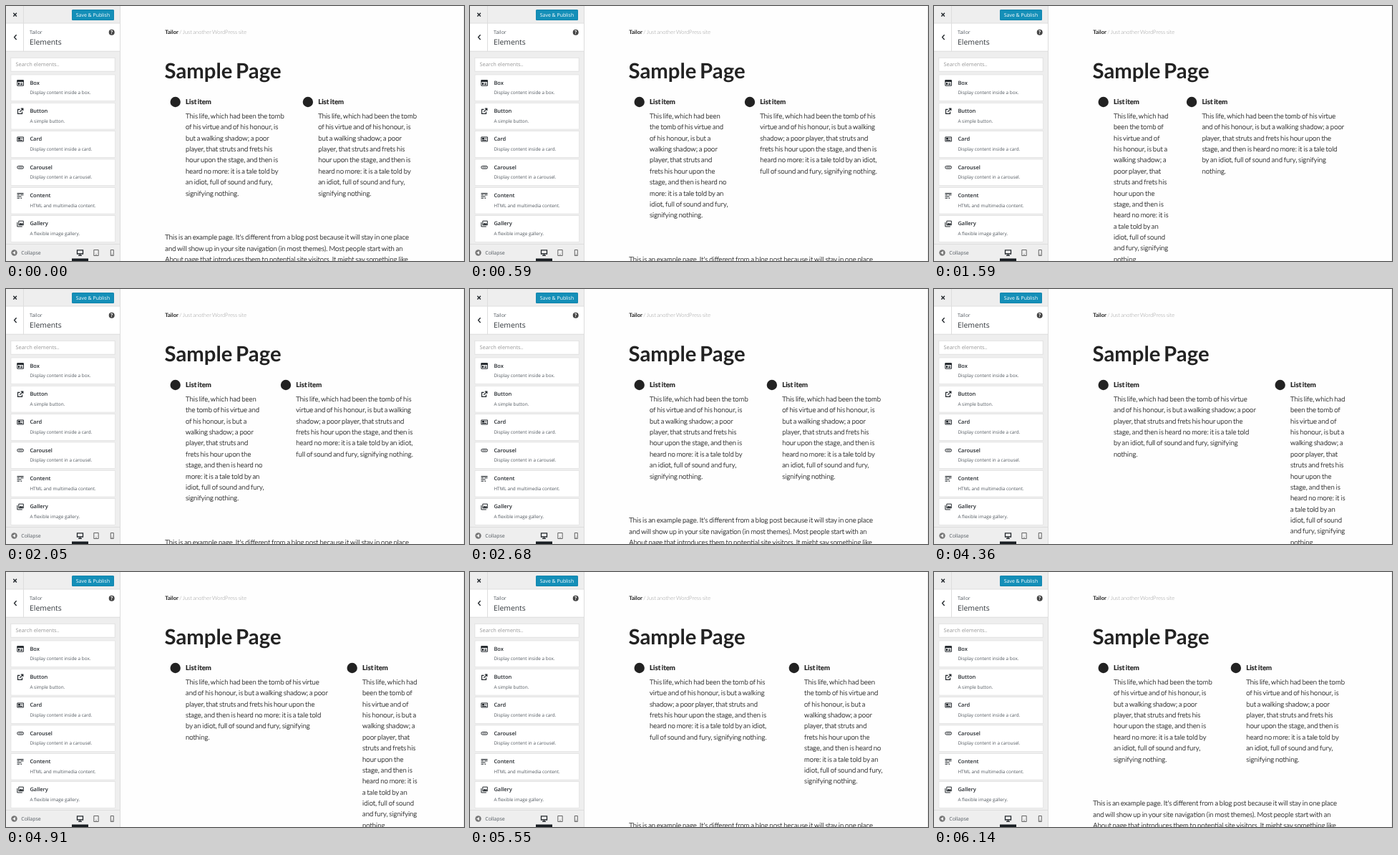
Write an HTML page that moves like this. It is 640x356 px and loops after 6630 ms.

```html
<!DOCTYPE html>
<html lang="en">
<head>
<meta charset="utf-8">
<title>Column resizing</title>
<style>
  html, body { margin: 0; width: 100%; height: 100%; overflow: hidden; background: #fefefe; }
  svg { display: block; width: 640px; height: 356px; }
  text { text-rendering: geometricPrecision; white-space: pre; }
  .page { font: 300 9.6px Lato, sans-serif; fill: #222; word-spacing: -.08em; }
  .page .bold { font-weight: 700; }
  #columns text { stroke: #222; stroke-width: .2px; }
  .panel { font: 6.93px "Open Sans", sans-serif; fill: #50575e; }
  .panel .name { font-size: 7.47px; font-weight: 600; fill: #23282d; }
  .panel .note { font-size: 6.4px; }
  .icon { fill: none; stroke: #23282d; stroke-width: 1; }
  .icon .solid { fill: #23282d; stroke: none; }
</style>
</head>
<body>
<svg viewBox="0 0 640 356">
  <g class="page">
    <text x="222.3" y="39" style="font-size:7.6px; word-spacing:-.08em"><tspan class="bold">Tailor</tspan><tspan fill="#999"> / Just another WordPress site</tspan></text>
    <text class="bold" x="221.5" y="101.2" style="font-size:29.3px; word-spacing:-.08em">Sample Page</text>
    <g id="columns"></g>
  </g>
  <path d="M639.5 0V356" stroke="#eee"/>
  <g class="panel">
    <path d="M0 0H159V356H0z" fill="#eee"/>
    <path d="M0 24H159V63H0z" fill="#fff"/>
    <path d="M159.5 0V356M0 24H159M0 63.2H159M24.5 0V63" stroke="#ddd" fill="none"/>
    <path d="M10.3 9.8l4.6 4.6m0-4.6l-4.6 4.6" stroke="#23282d" stroke-width="1.4"/>
    <path d="M14.6 40.2l-3 3.4 3 3.4" stroke="#23282d" stroke-width="1.4" fill="none"/>
    <rect x="92" y="5" width="59" height="15" rx="1.5" fill="#0f7ba3"/>
    <rect x="92.4" y="5.4" width="58.2" height="14" rx="1" fill="#148fb8"/>
    <text x="121.5" y="14.9" text-anchor="middle" fill="#fff">Save &amp; Publish</text>
    <text x="33" y="38.8">Tailor</text>
    <text x="33" y="53.6" fill="#32373c" style="font-size:10.4px">Elements</text>
    <circle cx="147.7" cy="36.7" r="4" fill="#444"/>
    <text x="147.7" y="39.1" text-anchor="middle" fill="#fff" style="font-weight:700">?</text>
    <rect x="6.8" y="72.3" width="145.4" height="18.9" fill="#fff" stroke="#ddd" stroke-width=".8"/>
    <text x="13.5" y="84.4" fill="#999" style="font-size:7.4px">Search elements..</text>
    <g id="cards"></g>
    <path d="M0 332H159V356H0z" fill="#eee"/>
    <path d="M0 332.5H159" stroke="#ddd"/>
    <circle cx="11.5" cy="344.5" r="4.2" fill="#777"/>
    <path d="M13 342v5l-4-2.5z" fill="#eee"/>
    <text x="21.3" y="347">Collapse</text>
    <path d="M92 352.5H115V356H92z" fill="#191e23"/>
    <g class="icon">
      <path d="M99.5 340.8h8v5.2h-8zM101 348.3h5M103.5 346v2" stroke-width="1.3"/>
      <path d="M122.8 340.5h6.4v8h-6.4zM125.3 347h1.4" stroke="#444" stroke-width=".8"/>
      <path d="M146.3 340.5h4v8h-4zM147.6 347h1.4" stroke="#444" stroke-width=".8"/>
    </g>
  </g>
</svg>
<script>
const LOOP = 6630, LINE = 15.36, COLUMN = 30.9;

const speech = ('This life, which had been the tomb of his virtue and of his honour, is but a walking ' +
  'shadow; a poor player, that struts and frets his hour upon the stage, and then is heard no more: ' +
  'it is a tale told by an idiot, full of sound and fury, signifying nothing.').split(' ');

// Words per line in base 36, from the narrowest column to the widest.
const wraps = ['44453343455431', '5664456862', '78667972', '9979b7', 'ab9c91'];

const example = [
  "This is an example page. It's different from a blog post because it will stay in one place",
  'and will show up in your site navigation (in most themes). Most people start with an',
  'About page that introduces them to potential site visitors. It might say something like'
];

// Each entry: time, split position in grid columns from the middle.
const splits = [[0, 0], [140, -1], [870, -2], [1640, -1], [2680, 0],
  [3540, 1], [4100, 2], [4960, 1], [5590, 0]];

const cards = [
  ['Box', 'Display content inside a box.',
    '<path d="M-4.2-3.5h8.6v7.4h-8.6zM0 .6h3M0 2.3h3"/><path class="solid" d="M-4.5-4h9v2.6h-9zM-3-.2h2v3h-2z"/>'],
  ['Button', 'A simple button.',
    '<path d="M-.5-2.2h-3v6h6v-3M-.8 1.2l4.3-4.3M.8-3.6h3v3" stroke-width="1.2"/>'],
  ['Card', 'Display content inside a card.',
    '<path d="M-4.2-3h8.6v6h-8.6zM1.2-.9h2M-3 1.5h6"/><path class="solid" d="M-3.2-2h3.4v2.5h-3.4z"/>'],
  ['Carousel', 'Display content in a carousel.',
    '<rect x="-4.2" y="-1.8" width="8.6" height="3.6" rx="1.5"/><path d="M-2.4 0h5" stroke-dasharray="1.2 .7"/>'],
  ['Content', 'HTML and multimedia content.',
    '<path d="M-4.5-3h9M-4.5-.8h3.5m1.2 0h4.3M-4.5 1.4h6M-4.5 3.6h3.5m1.2 0h2" stroke-width="1.1"/>'],
  ['Gallery', 'A flexible image gallery.',
    '<path d="M-2.2-3.8h6.5v5.6h-6.5zM-4.2-2v6h7"/><path class="solid" d="M-2 1.6l2-3 1.4 1.5 1.2-1.2 1.6 2.7z"/>']
];

const text = (x, y, content, style = '') => `<text x="${x}" y="${y}" class="${style}">${content}</text>`;
const lines = (x, y, list) => list.map((line, i) => text(x, y + i * LINE, line)).join('');

function wrap(pattern) {
  let start = 0;
  return [...pattern].map(c => speech.slice(start, start += parseInt(c, 36)).join(' '));
}

function listItem(x, content) {
  return `<circle cx="${x - 14.3}" cy="134" r="7.2"/>` +
    text(x, 136.5, 'List item', 'bold') + lines(x, 157, content);
}

function card([name, note, icon], i) {
  const y = 96 + i * 39.33;
  return `<rect x="7" y="${y}" width="145.5" height="36.7" fill="#fff" stroke="#ddd" stroke-width=".6"/>
    <g class="icon" transform="translate(20 ${y + 11.3})">${icon}</g>` +
    text(33.4, y + 13.8, name, 'name') + text(33.4, y + 27.3, note, 'note');
}

function layout(split) {
  const left = wrap(wraps[2 + split]), right = wrap(wraps[2 - split]);
  const below = 203.6 + LINE * Math.max(left.length, right.length);
  return listItem(251, left) + listItem(436.2 + COLUMN * split, right) + lines(222.3, below, example);
}

const columns = document.getElementById('columns');
document.getElementById('cards').innerHTML = cards.map(card).join('');

let shown;
function draw() {
  const time = performance.now() % LOOP;
  const split = splits.findLast(([start]) => start <= time)[1];
  if (split !== shown) columns.innerHTML = layout(shown = split);
  requestAnimationFrame(draw);
}
draw();
</script>
</body>
</html>
```
